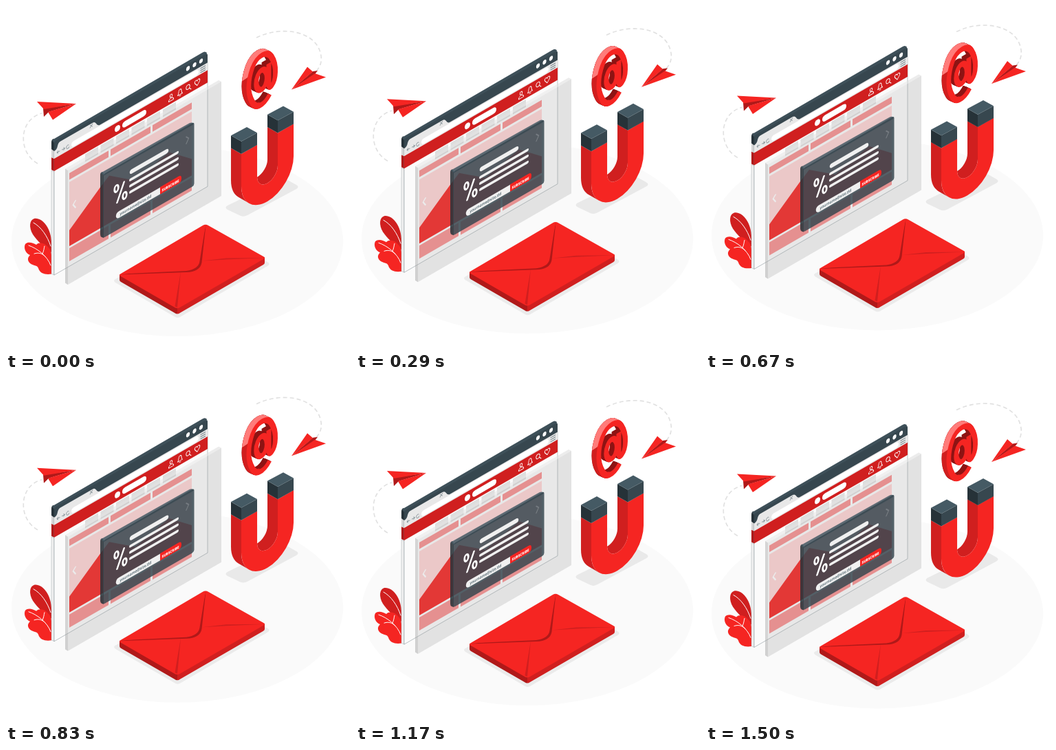
An HTML page that plays this animation: 500 by 500 pixels, repeating every 1.54 s.

```html
<!DOCTYPE html>
<html lang="en">
<head>
<meta charset="utf-8">
<title>Email marketing</title>
<style>
  html, body { margin: 0; width: 100%; height: 100%; overflow: hidden; background: #fff; }
  svg { display: block; width: 100vw; height: 100vh; }
  .red { fill: #f52522; }
  .deep { fill: #d01f1f; }
  .dark { fill: #b01919; }
  .slate { fill: #37474f; }
  .ink { fill: #263238; }
  .steel { fill: #455a64; }
  .white { fill: #fff; }
  .line { fill: none; stroke: #fff; stroke-linecap: round; stroke-linejoin: round; }
  .trail { fill: none; stroke: #e0e0e0; stroke-width: 1.6; stroke-dasharray: 6 4; }
  text { font-family: "Open Sans", "Noto Sans", sans-serif; }
</style>
</head>
<body>
<svg viewBox="0 0 500 500">
  <defs>
    <g id="cols">
      <path d="M0 0H57V1H0ZM60 0H118V1H60ZM121 0H178V1H121Z"/>
    </g>
    <g id="at" fill="none" stroke-linecap="butt">
      <path d="M13 28C3 40-10 38-16 25C-24 9-24-9-16-25C-8-39 8-39 16-25C21-16 23-6 22.5 2C22 17 12 24 11.5 10V-18"/>
      <ellipse cx="-.5" rx="9" ry="14"/>
    </g>
    <path id="rim" d="M18-27C8-43-10-41-18-27C-27-10-27 10-18 27C-12 38-4 40 3 38" fill="none"/>
    <clipPath id="glint"><path d="M-40-50H30V-20L-40-14Z"/></clipPath>
    <g id="tip">
      <path class="ink" d="M327 188.3L342 196.8V215L327 206.5Z"/>
      <path class="slate" d="M342 196.8L365 184.3V202L342 215Z"/>
      <path class="steel" d="M327 188.3L350 176L365 184.3L342 196.8Z"/>
    </g>
  </defs>

  <g id="scene">
    <ellipse cx="249" cy="342" rx="241" ry="138" fill="#fafafa"/>
    <path class="trail" d="M46 229C17 213 18 165 52 156"/>
    <path class="trail" d="M364 46C400 28 449 36 457 68C461 82 455 92 447 98"/>

    <!-- plant -->
    <path class="deep" d="M66 358C56 352 46 342 39 332C33 322 34 311 41 309C52 307 66 322 66 345Z"/>
    <path class="line" stroke-width="1" d="M40 315C51 321 60 334 65 349"/>
    <path class="red" d="M66 389.500C58 391 49 389 47 381C45 376 40 378 35 374C30 369 32 365 35 362C29 360 25 352 28 346C32 342 39 344 44 347C47 343 55 344 59 348C63 352 66 355 66 362Z"/>
    <path class="line" stroke-width="1" d="M33 348C45 352 60 363 65 377M53 360C55 356 55 353 56 349M41 360C47 358 52 359 57 364"/>

    <!-- browser -->
    <path fill="#f4f4f4" d="M86 236.5L309 108L313 110V276L90 405L86 402.5Z"/>
    <path fill="#f0f0f0" stroke="#8d999f" stroke-width=".4" d="M66 239L70 241V391L66 389Z"/>
    <path class="dark" d="M66 220L70 222V240L66 238Z"/>
    <path fill="#d5d5d5" d="M66 207L70 210V222L66 220Z"/>
    <path class="ink" d="M66 198Q66 194 69 193L71 197L70 211L66 208Z"/>
    <path fill="#3e5059" d="M67 195Q67 194 70 193L285 68Q289 65 292 68L291 72L70 199Z"/>
    <g transform="matrix(1 -.577 0 1 70 197)">
      <path fill="#fbfbfb" stroke="#6d7c83" stroke-width=".4" d="M0 14H223V194H0Z"/>
      <path class="slate" d="M0 15V3Q0 0 3 0H220Q223 0 223 3V15Z"/>
      <path fill="#e8e8e8" d="M0 25V14Q4 14 5 9Q6 5 9 5H56Q59 5 61 9Q63 14 67 14H223V25Z"/>
      <rect class="white" x="25" y="15.5" width="185" height="8" rx="4"/>
      <rect class="deep" y="25" width="223" height="18"/>
      <g class="white">
        <ellipse cx="194.5" cy="6" rx="2.7" ry="3.2"/>
        <ellipse cx="204" cy="6" rx="2.7" ry="3.2"/>
        <ellipse cx="213.5" cy="6" rx="2.7" ry="3.2"/>
        <ellipse cx="92" cy="34" rx="4" ry="4.4"/>
        <rect x="99" y="29.5" width="35" height="9" rx="4.4"/>
      </g>
      <g fill="none" stroke="#78868c" stroke-width=".7">
        <path d="M52 6L56 10.5M56 6L52 10.5M8.500 18.5H4L6 16.500M4 18.5L6 20.500M11 18.5H15.500L13.500 16.500M15.500 18.5L13.500 20.500"/>
        <path d="M21.500 17.5A2.1 2.6 0 1 0 21.800 20"/>
        <path stroke-width="1.2" d="M212.5 16.5H220M212.5 19.5H220M212.5 22.5H220"/>
      </g>
      <g class="line" stroke-width=".9" transform="translate(0 .5)">
        <ellipse cx="170" cy="31" rx="1.7" ry="2.2"/>
        <path d="M166.5 38V36.5Q168 34 170 34Q172 34 173.5 36.5V38Z"/>
        <path d="M179.5 36.5Q181 35 181 32Q181 29 183 29Q185 29 185 32Q185 35 186.5 36.5ZM182 38.5H184"/>
        <ellipse cx="194.5" cy="32.5" rx="2.7" ry="3.2"/>
        <path d="M196.5 35L199 38M208 38L204.7 33.5C203 30 207 28 208 31.5C209 28 213 30 211.3 33.5Z"/>
      </g>
      <path fill="#dedede" d="M45 44.500h19v11h-19zM67.500 44.500h19v11h-19zM90 44.500h19v11h-19zM112.500 44.500h19v11h-19zM135 44.500h19v11h-19zM158 44.500h19v11h-19z"/>
    </g>

    <!-- page content -->
    <g transform="matrix(1 -.577 0 1 92 243)">
      <use href="#cols" fill="#f89090" transform="scale(1 9.500)"/>
      <rect y="13" width="178" height="93" fill="#ffd4d4"/>
      <path class="red" d="M0 106V83L45 46.500L58 37L96 66L145 53L178 82V106Z"/>
      <use href="#cols" fill="#f89090" transform="translate(0 109) scale(1 19)"/>
      <path class="line" stroke-width="1.800" d="M9 45L5.500 49L9 55"/>
    </g>

    <!-- glass panel -->
    <path fill="#909090" fill-opacity=".18" d="M86 236.5L309 108L313 110V276L90 405L86 402.5Z"/>
    <path fill="#9a9a9a" fill-opacity=".25" d="M86 236.5L90 239V405L86 402.5Z"/>
    <path fill="#fff" fill-opacity=".35" d="M86 236.5L309 108L313 110L90 239Z"/>

    <!-- popup -->
    <path class="ink" fill-opacity=".85" d="M137 245Q137 242 140 241L142 244V337L139 336Q137 335 137 332Z"/>
    <path class="steel" fill-opacity=".85" d="M138 242.5L267 170Q270 168.500 273 170.5L272 172.5L142 246.5Z"/>
    <g transform="matrix(1 -.577 0 1 141 245)">
      <rect class="slate" fill-opacity=".84" width="132.500" height="92.500" rx="3"/>
      <path class="line" stroke="#8b9499" stroke-opacity=".2" stroke-width="1.500" d="M121 15L124.500 19L121 25"/>
      <g class="line" stroke="#f5f5f5">
        <ellipse cx="19.500" cy="31.500" rx="2.800" ry="4.800" stroke-width="2.700"/>
        <ellipse cx="31.500" cy="48.500" rx="2.800" ry="4.800" stroke-width="2.700"/>
        <path stroke-width="2.800" d="M30.500 28.500L20.500 52.500"/>
        <path stroke="#f0f0f0" stroke-width="6.500" d="M42 19.500H92"/>
        <path stroke="#f0f0f0" stroke-width="4" d="M40 30.500H108M40 39.400H108M40 48.300H108"/>
      </g>
      <path fill="#f0f0f0" d="M83 66.500H23.500A4.700 4.900 0 0 0 23.500 76.300H83Z"/>
      <path class="red" d="M83 66H110Q114 66 114 71Q114 76 110 76.500H83Z"/>
    </g>
    <text transform="matrix(.866 -.5 0 1 165.500 304.500)" font-size="5.800" font-weight="600" fill="#455a64">yourname@site.tld</text>
    <text transform="matrix(.866 -.5 0 1 226.500 270)" font-size="5.300" font-weight="800" fill="#fff">SUBSCRIBE</text>

    <!-- magnet -->
    <path fill="#e9e9e9" d="M322 290Q317 293 322 296L341 305Q346 307 351 304L422 266Q427 263 422 260L404 250Z"/>
    <g transform="matrix(.866 -.5 0 1 342 215)">
      <path class="deep" d="M61.200 0V47A17.300 17.300 0 0 1 26.600 47A17.300 17.300 0 0 0 43.900 29.800V-17.200Z"/>
      <path class="deep" d="M0 0V47A43.900 43.900 0 0 0 12.900 78L-4.400 60.800A43.900 43.900 0 0 1-17.300 29.800V-17.200Z"/>
      <path class="red" d="M0 0V47A43.900 43.900 0 0 0 87.800 47V0H61.200V47A17.300 17.300 0 0 1 26.600 47V0Z"/>
    </g>
    <use href="#tip"/>
    <use href="#tip" x="53" y="-30.500"/>

    <!-- at sign -->
    <g id="sign" transform="matrix(.866 -.5 0 1 372 107)"></g>

    <!-- planes -->
    <path class="dark" d="M54 149L102 142L62 154L55 161Z"/>
    <path class="red" d="M45 139L102 142L55 150ZM61 154L102 142L68 165.500Z"/>
    <path class="dark" d="M415 121.500L446 95L453 94L449 99Z"/>
    <path class="red" d="M415 121.500L438 88.500L446 95.500ZM415 121.500L449 98L465 103.500Z"/>

    <!-- envelope -->
    <path fill="#ebebeb" d="M159 397Q155 399 159 402L246 452Q249 454 253 452L380 378Q385 375 380 372L290 324Z"/>
    <path class="dark" d="M165 390L249 438V447.500Q247 447.500 245 446L167 401Q165 400 165 398Z"/>
    <path class="deep" d="M249 438L376 365V373Q376 375 374 376L253 446Q251 447.500 249 447.500Z"/>
    <path class="red" d="M167 389L286 319Q290 316.500 294 319L374 364Q378 366 374 368L253 438Q249 440.500 245 438L167 393Q163 391 167 389Z"/>
    <path class="deep" d="M254 386L249 438L245.500 436.500ZM285 370.500L320 366.500L376 366L320 368.500Z"/>
    <path class="dark" d="M165 390.500L262 387Q282 386.500 284.500 373L290.500 318L277 378Z"/>
    <path class="red" d="M167 389.500L262 385Q280 382.500 281.500 371L290 319L240 348Z"/>
  </g>
</svg>
<script>
  const NS = "http://www.w3.org/2000/svg";
  const scene = document.getElementById("scene");
  const sign = document.getElementById("sign");

  function layer(id, depth, stroke, width, clip) {
    const g = document.createElementNS(NS, "g");
    const use = document.createElementNS(NS, "use");
    use.setAttribute("href", id);
    use.setAttribute("transform", `translate(${-depth} ${-depth * 0.9})`);
    use.setAttribute("stroke", stroke);
    use.setAttribute("stroke-width", width);
    if (clip) g.setAttribute("clip-path", clip);
    g.append(use);
    sign.append(g);
  }

  // Extruded letter: walls from back to front, outer rim, then the face.
  for (let d = 8; d > 0; d--) layer("#at", d, "#8e1414", 8);
  for (let d = 8; d > 0; d--) layer("#rim", d, "#d01f1f", 2.5);
  for (let d = 8; d > 0; d--) layer("#rim", d, "#ff7c7a", 2.5, "url(#glint)");
  layer("#at", 0, "#f52522", 8);

  const LOOP = 1540, STEP = 1000 / 24, RISE = 10, LEAD = 35, BASE = 0.5;

  // Linear rise and fall, held for each step of 24 per second.
  function draw(now) {
    const tick = Math.floor(((now % LOOP) + 4) / STEP);
    const p = ((tick * STEP + LEAD) % LOOP) / LOOP;
    const y = BASE - RISE * (1 - Math.abs(1 - 2 * p));
    scene.setAttribute("transform", `translate(0 ${y.toFixed(3)})`);
  }

  const start = performance.now();
  function loop() {
    draw(performance.now() - start);
    requestAnimationFrame(loop);
  }
  draw(0);
  requestAnimationFrame(loop);
</script>
</body>
</html>
```
